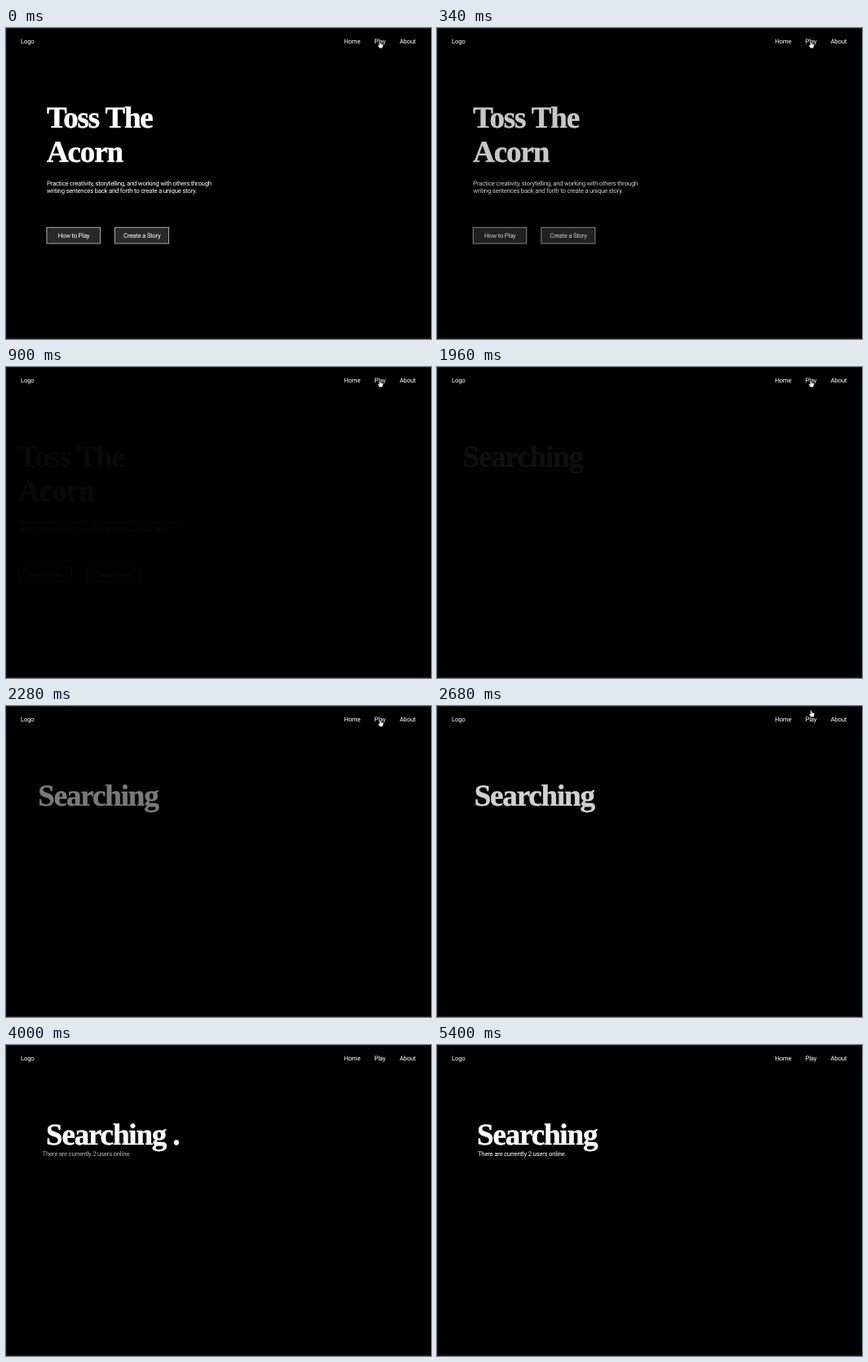
Recreate the animation shown at these times as an HTML page. Size 521 px wide and 381 px high, loop 5660 ms.

```html
<!DOCTYPE html>
<html lang="en">
<head>
<meta charset="utf-8">
<title>Story game</title>
<style>
  html, body { margin: 0; width: 100%; height: 100%; overflow: hidden; background: #000; }
  svg { display: block; width: 100%; height: 100%; }
  text { font: 7.8px Roboto, "Liberation Sans", sans-serif; letter-spacing: -.25px; fill: #fff; text-rendering: geometricPrecision; }
  .title { font: bold 37px "Liberation Serif", "Noto Serif", serif; letter-spacing: -1.15px; stroke: #fff; stroke-width: .5px; }
  .button rect { fill: #292929; stroke: #a8a8a8; }
  .button text { text-anchor: middle; }
</style>
</head>
<body>
<svg viewBox="0 0 521 381">
  <path d="M0 .5H521M.5 0V381" stroke="#1c1c1c"/>
  <path d="M0 380.5H521" stroke="#251c22"/>
  <text x="18" y="19">Logo</text>
  <text x="414.3" y="19">Home</text>
  <text x="451.5" y="19">Play</text>
  <text x="482.5" y="19">About</text>
  <g id="home">
    <text class="title" x="50" y="121.7">Toss The</text>
    <text class="title" x="50" y="164">Acorn</text>
    <text x="50" y="193.4">Practice creativity, storytelling, and working with others through</text>
    <text x="50" y="202.4">writing sentences back and forth to create a unique story.</text>
    <g class="button">
      <rect x="50" y="244.3" width="65.5" height="19.7"/>
      <text x="83" y="257">How to Play</text>
    </g>
    <g class="button">
      <rect x="133.5" y="244.3" width="66" height="19.7"/>
      <text x="166.7" y="257">Create a Story</text>
    </g>
  </g>
  <text id="search" class="title" x="49" y="121.7"></text>
  <text id="users" x="50" y="136.2">There are currently 2 users online.</text>
  <path id="hand" d="M457.3 17q.8-.8 1.6 0v2.2l2.7.6q.9.4.7 1.5l-.9 3.5h-3.6l-2.3-3.2q-.2-1 1.8-.4z"
        fill="#fff" stroke="#000" stroke-width=".5"/>
</svg>
<script>
  const LOOP = 5660;
  const DOT_TIMES = [3640, 4280, 4800];
  const DOTS_CLEAR = 5400;
  const [home, search, users, hand] =
    ['home', 'search', 'users', 'hand'].map(id => document.getElementById(id));

  const progress = (t, from, to) => Math.min(1, Math.max(0, (t - from) / (to - from)));
  const easeInOut = u => (1 - Math.cos(Math.PI * u)) / 2;

  // Critically damped spring from 0 to 1
  function settle(t, start) {
    const k = Math.max(0, t - start) * 0.0038;
    return 1 - (1 + k) * Math.exp(-k);
  }

  function place(el, x, y, opacity) {
    el.setAttribute('transform', `translate(${x} ${y})`);
    el.setAttribute('opacity', opacity);
  }

  function enter(el, t, start) {
    const p = settle(t, start);
    place(el, -18.5 * (1 - p), 0, p);
  }

  function draw(t) {
    const out = easeInOut(progress(t, 150, 870));
    place(home, -35 * out, 0, t < 1960 ? Math.max(0.03, (1 - out) ** 1.4) : 0);

    const dots = t < DOTS_CLEAR ? DOT_TIMES.filter(d => t >= d).length : 0;
    search.textContent = 'Searching' + ' .'.repeat(dots);
    enter(search, t, 1860);
    enter(users, t, 3355);

    const nudge = 0.5 * progress(t, 2200, 2260);
    const lift = progress(t, 2480, 2800) ** 2;
    place(hand, nudge, nudge - 30 * lift, lift < 1 ? 1 : 0);
  }

  function tick(now) {
    draw(now % LOOP);
    requestAnimationFrame(tick);
  }
  draw(0);
  requestAnimationFrame(tick);
</script>
</body>
</html>
```
